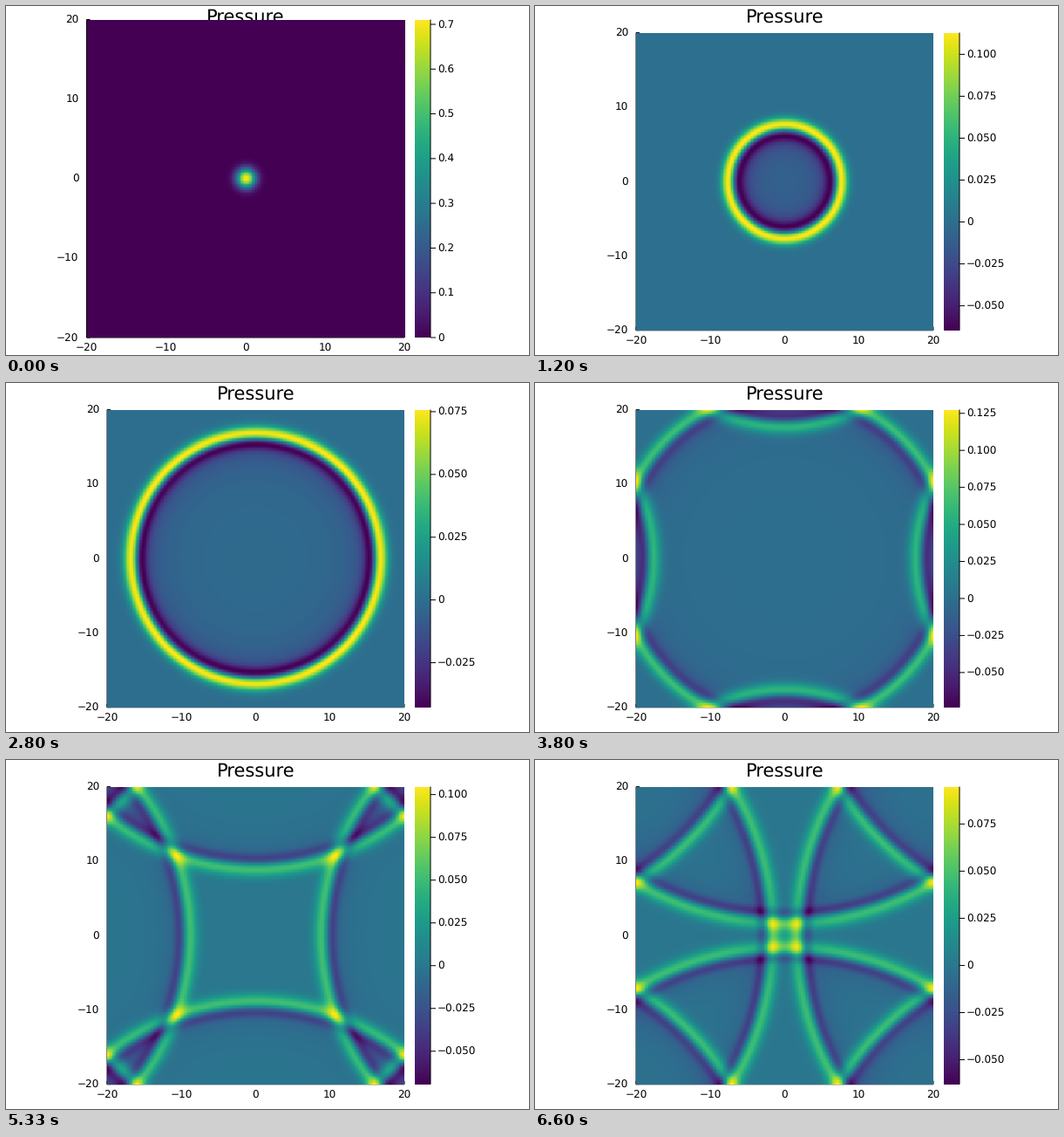
Recreate the animation shown at these times as a matplotlib script. Size 600 by 400 pixels, loop 6.67 s.

```python
import numpy as np
import matplotlib.pyplot as plt
from matplotlib.animation import FuncAnimation
from matplotlib.patches import Rectangle

plt.rcParams["font.family"] = "DejaVu Sans"
plt.rcParams["text.hinting"] = "none"

W, H = 600, 400
PX = 0.72                     # points per pixel at 100 dpi
FRAMES, STEPS = 100, 10
N, HALF = 255, 20.0
RIGHT = 457                   # right edge of the heatmap
BAR = 469, 487                # colour bar edges


def simulate():
    """Acoustic waves on a staggered grid with rigid walls."""
    x = np.linspace(-HALF, HALF, N)
    dx = x[1] - x[0]
    dt = dx / 4.1
    c = dt / dx
    p = np.exp(-x[None, :] ** 2 - x[:, None] ** 2)
    vx = np.zeros((N, N + 1))
    vy = np.zeros((N + 1, N))
    shots = []
    for _ in range(FRAMES):
        for _ in range(STEPS):
            vx[:, 1:-1] -= c * np.diff(p, axis=1)
            vy[1:-1] -= c * np.diff(p, axis=0)
            p -= c * (np.diff(vx, axis=1) + np.diff(vy, axis=0))
        shots.append(p.astype(np.float32))
    return shots, dx


def nice_ticks(lo, hi):
    """Pick 5 to 8 ticks by count, coverage and roundness of the step."""
    span = hi - lo
    best, choice = -1, None
    for z in range(0, -5, -1):
        for q, nice in ((5, 0.9), (3, 0.2), (2.5, 0.5), (2, 0.7), (1, 1.0)):
            step = q * 10.0 ** z
            a = int(np.ceil(lo / step - 1e-6))
            b = int(np.floor(hi / step + 1e-6))
            n = b - a + 1
            if not 5 <= n <= 8:
                continue
            score = ((1 - abs(n - 5) / 5) / 4 + (a <= 0 <= b) / 6
                     + 0.5 * span / ((n - 1) * step) + nice / 4)
            if score > best + 1e-9:
                best = score
                choice = step, a, b, max(0, -z + (q == 2.5))
    step, a, b, digits = choice
    return [(k * step, f"{k * step:.{digits}f}".replace("-", "\u2212") if k else "0")
            for k in range(a, b + 1)]


shots, dx = simulate()
ramp = np.linspace(1, 0, 256)[:, None]

fig = plt.figure(figsize=(W / 100, H / 100), dpi=100, facecolor="white")
ax = fig.add_axes([0, 0, 1, 1])


def line(x, y, z=1):
    ax.plot(x, y, color="black", lw=PX, zorder=z, snap=False,
            solid_capstyle="butt")


def label(x, y, s, ha, size=12, z=3):
    ax.text(x, y, s, ha=ha, va="baseline", fontsize=size * PX, zorder=z)


def image(data, extent, box, **kw):
    x0, x1, y1, y0 = box
    im = ax.imshow(data, extent=extent, cmap="viridis", aspect="auto",
                   interpolation="nearest", zorder=2, **kw)
    im.set_clip_path(Rectangle((x0, y0), x1 - x0, y1 - y0,
                               transform=ax.transData))


def draw(i):
    p = shots[i]
    lo, hi = float(p.min()), float(p.max())
    # the very first picture has looser margins
    left, top, bottom = (92.5, 15.5, 380) if i == 0 else (116, 30.5, 371.75)
    mid_x, mid_y = (left + RIGHT) / 2, (top + bottom) / 2
    unit = (RIGHT - left) / (2 * HALF)

    ax.clear()
    ax.axis("off")

    # title, axis lines and ticks lie under the heatmap
    label(mid_x, 18.5, "Pressure", "center", 21, 1)
    line([left, left], [top, bottom])
    line([left, RIGHT], [bottom, bottom])
    for v in range(-20, 21, 10):
        x, y = mid_x + v * unit, mid_y - v * unit
        line([x, x], [bottom, bottom - 4])
        line([left, left + 4], [y, y])
        s = str(v).replace("-", "\u2212")
        label(x, bottom + 16, s, "center")
        label(left - 9, y + 4.4, s, "right")

    r = (HALF + dx / 2) * unit
    image(p, (mid_x - r, mid_x + r, mid_y + r, mid_y - r),
          (left, RIGHT, bottom, top), vmin=lo, vmax=hi)

    bar = (*BAR, bottom, top)
    image(ramp, bar, bar, vmin=0, vmax=1)
    line([BAR[1], BAR[1]], [top, bottom], 3)
    for v, s in nice_ticks(lo, hi):
        y = bottom - (v - lo) / (hi - lo) * (bottom - top)
        line([BAR[1], BAR[1] + 6], [y, y], 3)
        label(495.2, y + 4.4, s, "left")

    ax.set_xlim(0, W)
    ax.set_ylim(H, 0)
    return []


anim = FuncAnimation(fig, draw, frames=FRAMES, init_func=lambda: draw(0),
                     interval=66.6, repeat=True, repeat_delay=0, blit=False)
plt.show()
```
